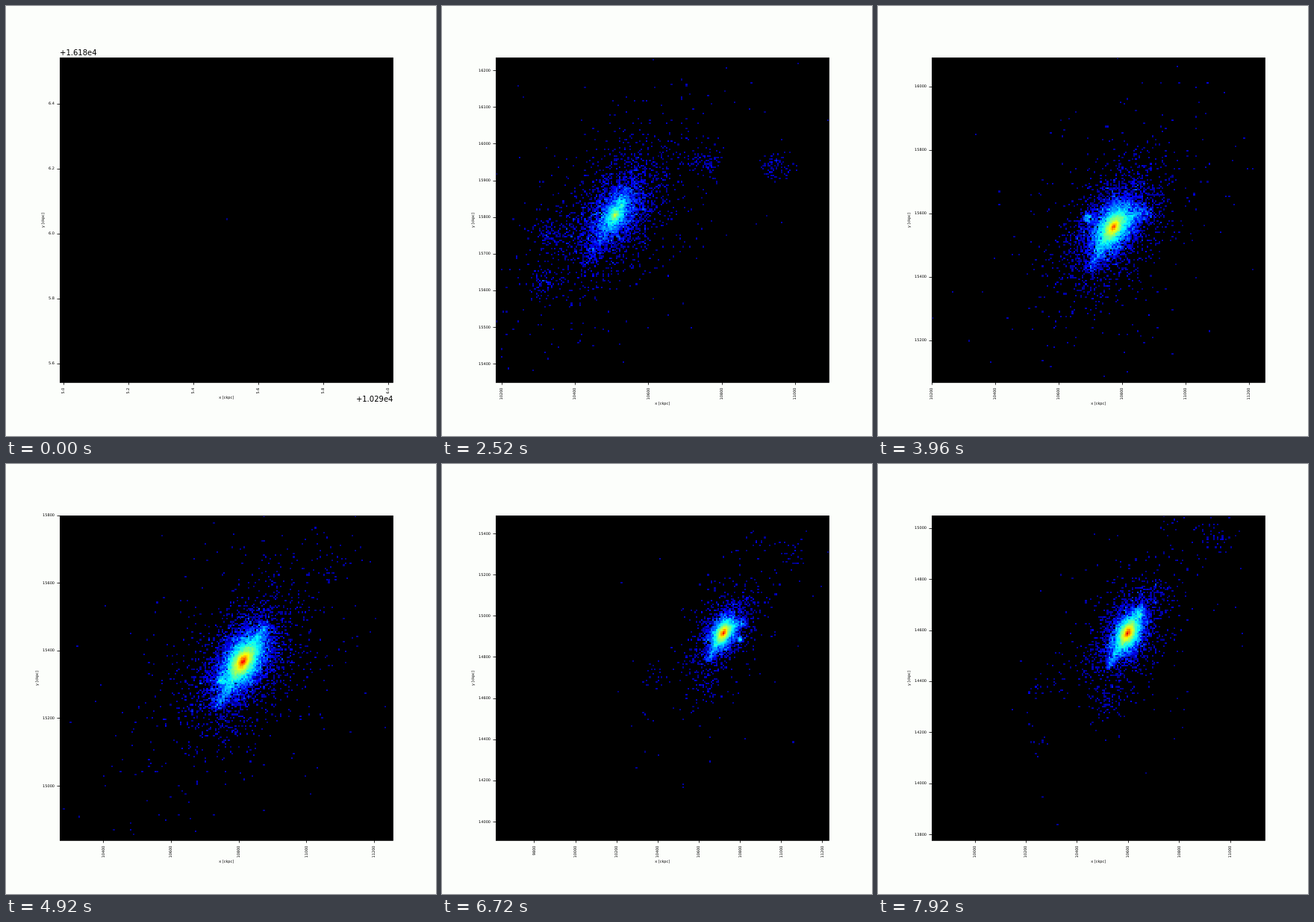
An HTML page with a canvas for the animation above (8000 ms loop, 576 by 576 pixels).

```html
<!DOCTYPE html>
<html lang="en">
<head>
<meta charset="utf-8">
<title>Particle density map</title>
<style>
  html, body { margin: 0; height: 100%; overflow: hidden; background: #fcfefb; }
  canvas { display: block; width: 576px; height: 576px; }
</style>
</head>
<body>
<canvas id="stage" width="576" height="576"></canvas>
<script>
const LOOP = 8000, STEP = 120, BINS = 200, LOG_MAX = 7.5;
const AXES = { left: 72, top: 69.12, width: 446.4, height: 434.88, cx: 295.2, cy: 286.56 };
const RIGHT = AXES.left + AXES.width, BOTTOM = AXES.top + AXES.height;
const ctx = document.getElementById('stage').getContext('2d');
const grid = document.createElement('canvas');
grid.width = grid.height = BINS;
const gridCtx = grid.getContext('2d');

// time, view centre x and y, pixels per unit, galaxy x and y
const path = [
  [0, 10295.5016, 16186.0424, 435, 10295.5, 16186],
  [360, 10440, 16040, 1.2, 10326, 16132],
  [2520, 10637.5, 15793.2, .4914, 10508.9, 15806.5],
  [3960, 10725, 15579.9, .425, 10772.8, 15557.7],
  [4920, 10762.9, 15320, .453, 10812, 15368.7],
  [5880, 10708.6, 15085.3, .4307, 10767.3, 15158.6],
  [6720, 10421.4, 14699.9, .2757, 10718, 14919.5],
  [7920, 10483, 14414.2, .342, 10597.9, 14589.8]
];
// Groups that fall into the galaxy, as offsets from it
const infall = [[244, 140], [440, 130], [-183, -55], [-195, -185]];
const FALL_START = 2520, FALL_END = 4400;

const mix = (a, b, u) => a + (b - a) * u;
const clamp = v => Math.min(1, Math.max(0, v));
const radians = deg => deg * Math.PI / 180;
const polar = (deg, r) => ({ x: r * Math.cos(radians(deg)), y: r * Math.sin(radians(deg)) });

function seeded(seed) {
  return () => {
    seed = (seed + 0x6D2B79F5) | 0;
    let h = Math.imul(seed ^ seed >>> 15, 1 | seed);
    h = h + Math.imul(h ^ h >>> 7, 61 | h) ^ h;
    return ((h ^ h >>> 14) >>> 0) / 4294967296;
  };
}

function poisson(mean, random) {
  if (mean > 30) {
    const spread = random() + random() + random() + random() - 2;
    return Math.max(1, mean + spread * Math.sqrt(3 * mean));
  }
  const limit = Math.exp(-mean);
  let count = 0;
  for (let p = random(); p > limit; p *= random()) count++;
  return count;
}

function cameraAt(time) {
  const i = time < path[1][0] ? 0 : path.findLastIndex((p, n) => p[0] <= time && n < path.length - 1);
  const a = path[i], b = path[i + 1], u = i ? (time - a[0]) / (b[0] - a[0]) : 0;
  const [, cx, cy, , gx, gy] = a.map((v, n) => mix(v, b[n], u));
  return { cx, cy, gx, gy, scale: a[3] * (b[3] / a[3]) ** u };
}

function clumpsAt(time, mass) {
  const satellite = polar(66 + .065 * (time - FALL_START), 40 + 45 * clamp((time - FALL_START) / 1400));
  const clumps = [{ ...satellite, size: 8, peak: 13 * mass }];
  const fall = (FALL_END - time) / (FALL_END - FALL_START);
  if (fall > 0) for (const [x, y] of infall) {
    clumps.push({ x: x * fall, y: y * fall, size: 22, peak: .8 * mass });
  }
  const random = seeded(5), age = clamp((time - 4000) / 2500);
  for (let n = 0; n < 10; n++) {
    const spot = polar((n % 3 ? 235 : 62) + 50 * (random() - .5), (160 + 400 * random()) * (.6 + .4 * age));
    clumps.push({ ...spot, size: 18 + 30 * random(), peak: .22 * age * random() });
  }
  return clumps;
}

// Expected particles per bin, as a function of the offset from the galaxy centre
function densityAt(time) {
  const mass = 1 - clamp(1 - time / 5000) ** 1.5;
  const tilt = radians(50 + 14 * time / LOOP), c = Math.cos(tilt), s = Math.sin(tilt);
  const radius = 2.2 * (3 - 2 * mass);
  const clumps = clumpsAt(time, mass);
  const swing = 45 - 17 * Math.cos(2 * Math.PI * (time - 3900) / 2750);
  const arms = [polar(240, 145), polar(swing, 115)];
  const gauss = (r2, size) => r2 < 16 * size * size ? Math.exp(-r2 / (2 * size * size)) : 0;

  return (x, y) => {
    const along = x * c + y * s, across = (y * c - x * s) / .57, r2 = along * along + across * across;
    const r = Math.sqrt(r2) * .57 / radius;
    let mean = Math.exp(LOG_MAX * (mass - .142 * r ** .55));
    mean += mass * mass * (.14 * gauss(r2, 150) + .014 * gauss(r2, 330));
    for (const k of clumps) mean += k.peak * gauss((x - k.x) ** 2 + (y - k.y) ** 2, k.size);
    for (const a of arms) {
      const u = clamp((x * a.x + y * a.y) / (a.x * a.x + a.y * a.y));
      mean += 9 * mass ** 5 * (1 - .5 * u) * gauss((x - u * a.x) ** 2 + (y - u * a.y) ** 2, 9);
    }
    return mean;
  };
}

function drawDensity({ cx, cy, gx, gy, scale }, time) {
  const random = seeded(time + 17), image = gridCtx.createImageData(BINS, BINS);
  const paint = (col, row, v) => {
    const jet = centre => 255 * clamp(1.5 - Math.abs(4 * v - centre));
    image.data.set([jet(3), jet(2), jet(1), 255], 4 * (row * BINS + col));
  };
  const density = densityAt(time);
  if (time < path[1][0]) paint(BINS / 2, BINS / 2 - 1, 0);
  else for (let row = 0; row < BINS; row++) {
    const y = cy - gy - ((row + .5) / BINS - .5) * AXES.height / scale;
    for (let col = 0; col < BINS; col++) {
      const x = cx - gx + ((col + .5) / BINS - .5) * AXES.width / scale;
      const count = poisson(density(x, y), random);
      if (count) paint(col, row, clamp((Math.log(count) + .5 * random() / count) / LOG_MAX));
    }
  }
  gridCtx.putImageData(image, 0, 0);
  ctx.imageSmoothingEnabled = false;
  ctx.drawImage(grid, AXES.left, AXES.top, AXES.width, AXES.height);
}

function text(string, x, y, { size = 5, align = 'center', base = 'middle', turned = false } = {}) {
  ctx.save();
  ctx.translate(x, y);
  if (turned) ctx.rotate(-Math.PI / 2);
  ctx.font = `${size}px "DejaVu Sans", sans-serif`;
  ctx.textAlign = align;
  ctx.textBaseline = base;
  ctx.fillText(string, 0, 0);
  ctx.restore();
}

function ticks(centre, span, scale) {
  const raw = span / 9, unit = 10 ** Math.floor(Math.log10(raw));
  const step = unit * [1, 2, 2.5, 5, 10].find(m => m * unit >= raw);
  const edge = .4 / scale, lo = centre - span / 2 - edge, hi = centre + span / 2 + edge;
  const offset = span < 10 ? Math.floor(lo / 10) * 10 : 0;
  const list = [];
  for (let n = Math.ceil(lo / step); n * step <= hi; n++) {
    list.push({ shift: (n * step - centre) * scale, label: (n * step - offset).toFixed(offset ? 1 : 0) });
  }
  return { list, offset: offset && `+${offset / 1e4}e4`, labelWidth: offset ? 7.95 : 15.9 };
}

function drawAxes({ cx, cy, scale }) {
  ctx.fillStyle = '#000';
  ctx.lineWidth = .8;
  ctx.strokeRect(72.5, 69.5, 446, 435);
  const xs = ticks(cx, AXES.width / scale, scale);
  const ys = ticks(cy, AXES.height / scale, scale);
  for (const { shift, label } of xs.list) {
    const x = AXES.cx + shift;
    ctx.fillRect(Math.floor(x) + .1, BOTTOM, .8, 3.5);
    text(label, Math.round(x), 511.5, { align: 'right', turned: true });
  }
  for (const { shift, label } of ys.list) {
    const y = AXES.cy - shift;
    ctx.fillRect(AXES.left - 3.5, Math.floor(y) + .1, 3.5, .8);
    text(label, 65, Math.round(y), { align: 'right' });
  }
  text('x [ckpc]', AXES.cx, 517 + xs.labelWidth);
  text('y [ckpc]', 57.7 - ys.labelWidth, AXES.cy + .5, { turned: true });
  if (xs.offset) text(xs.offset, RIGHT, 530, { size: 10, align: 'right', base: 'alphabetic' });
  if (ys.offset) text(ys.offset, AXES.left, 66, { size: 10, align: 'left', base: 'alphabetic' });
}

let shown = -1;
function play(now) {
  const time = Math.floor(now % LOOP / STEP) * STEP;
  if (time !== shown) {
    shown = time;
    const camera = cameraAt(time);
    ctx.clearRect(0, 0, 576, 576);
    ctx.fillStyle = '#000';
    ctx.fillRect(AXES.left, AXES.top, AXES.width, AXES.height);
    drawDensity(camera, time);
    drawAxes(camera);
  }
  requestAnimationFrame(play);
}
play(performance.now());
</script>
</body>
</html>
```
